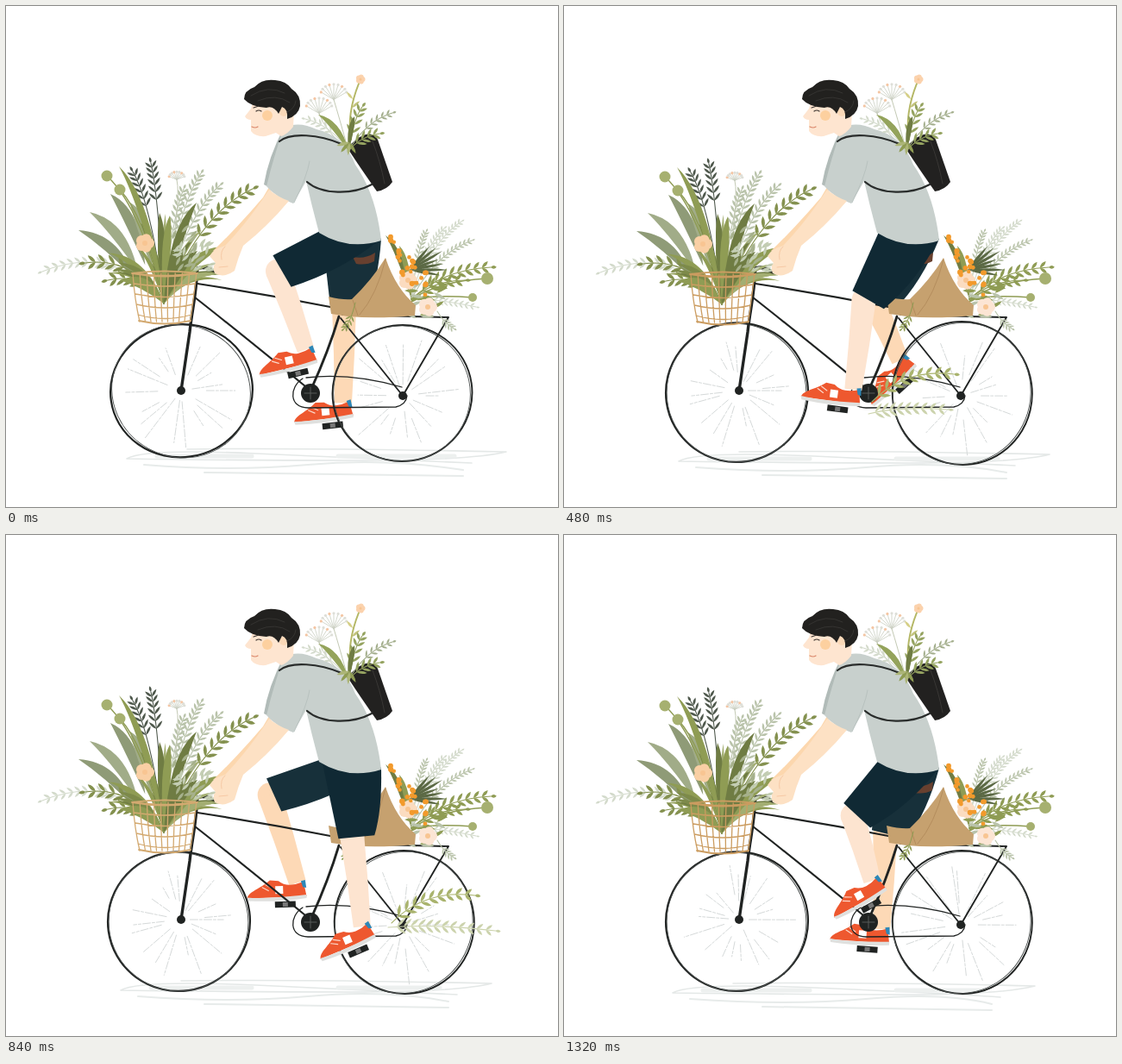
Animation, 640 px wide and 581 px high, one loop 1.44 s. Source, as an HTML page:

```html
<!DOCTYPE html>
<html lang="en">
<head>
<meta charset="utf-8">
<title>Flower ride</title>
<style>
html, body { margin: 0; width: 100%; height: 100%; overflow: hidden; background: #fff; }
svg { display: block; width: 100%; height: 100%; }
</style>
</head>
<body>
<svg id="stage" viewBox="0 0 640 581" fill="none" stroke-linecap="round" stroke-linejoin="round">
  <g id="back"></g>
  <g id="bike"></g>
  <g id="basket"></g>
  <g id="front"></g>
  <g id="rider"></g>
</svg>
<script>
const STEP = 120, COUNT = 12, { sin, cos, PI } = Math;
const INK = '#202322', OLIVE = '#8f9c54', MOSS = '#6f7c43', SAGE = '#b9c3aa', PALE = '#d3dacb', SLATE = '#4e584c';
const layer = id => document.getElementById(id);

// Drawing helpers
const fill = (d, c) => `<path d="${d}" fill="${c}"/>`;
const line = (d, c = INK, w = 2, extra = '') => `<path d="${d}" stroke="${c}" stroke-width="${w}" ${extra}/>`;
const dot = (x, y, r, c) => `<circle cx="${x}" cy="${y}" r="${r}" fill="${c}"/>`;
const oval = (x, y, rx, ry, c, w, turn = 0) =>
  `<ellipse cx="${x}" cy="${y}" rx="${rx}" ry="${ry}" stroke="${c}" stroke-width="${w}" transform="rotate(${turn} ${x} ${y})"/>`;
const each = (list, f) => list.map(f).join('');
const times = (n, f) => each([...Array(n).keys()], f);
const mix = (a, b, t) => [a[0] + (b[0] - a[0]) * t, a[1] + (b[1] - a[1]) * t];

function random(seed) {
  return () => (seed = (seed * 16807) % 2147483647) / 2147483647;
}

function leaf([x, y], angle, len, w, c) {
  const at = `translate(${x.toFixed(1)} ${y.toFixed(1)}) rotate(${angle.toFixed(1)})`;
  return `<path d="M0 0Q${len / 2} ${-w} ${len} 0Q${len / 2} ${w} 0 0" fill="${c}" transform="${at}"/>`;
}

// Stems rise from the root and lean over; flat ones arch more
function bend([x0, y0], [x1, y1], lift) {
  const dx = x1 - x0, flat = Math.abs(dx) / Math.hypot(dx, y1 - y0);
  return [x0 + dx * .4, y0 + (y1 - y0) * .75 - lift * Math.abs(dx) * flat ** 4];
}

function sprig(root, tip, len, w, c, from = .4, lift = .35) {
  const mid = bend(root, tip, lift), size = Math.hypot(tip[0] - root[0], tip[1] - root[1]);
  const n = Math.max(4, Math.round(size * (1 - from) / len / .75));
  return line(`M${root}Q${mid} ${tip}`, c, 1.1) + times(n + 1, i => {
    const t = from + (1 - from) * i / n, a = mix(root, mid, t), b = mix(mid, tip, t), p = mix(a, b, t);
    const turn = Math.atan2(b[1] - a[1], b[0] - a[0]) * 180 / PI, l = len * (1.15 - .4 * t);
    return i === n ? leaf(p, turn, l * .7, w, c) : leaf(p, turn - 42, l, w, c) + leaf(p, turn + 42, l, w, c);
  });
}

function blade(root, tip, w, c, lift = .35) {
  const [cx, cy] = bend(root, tip, lift), d = Math.hypot(tip[0] - root[0], tip[1] - root[1]);
  const ox = (root[1] - tip[1]) / d * w, oy = (tip[0] - root[0]) / d * w;
  return fill(`M${root}Q${cx + ox} ${cy + oy} ${tip}Q${cx - ox} ${cy - oy} ${root}`, c);
}

function bud(root, tip, r) {
  return line(`M${root}Q${bend(root, tip, .05)} ${tip}`, OLIVE, 1.5) + dot(...tip, r, '#a6b070');
}

function umbel(root, [x, y], r) {
  const hub = [x, y + r * .7];
  return line(`M${root}Q${x + 6} ${y + 30} ${hub}`, '#c3c9b4', 1) + times(9, i => {
    const a = PI * (1.06 + i * .11), p = [x + r * cos(a), y + 4 + r * .75 * sin(a)];
    return line(`M${hub}L${p}`, '#c9cec0', .8) + dot(...p, 1.6, i % 3 ? '#dedfd8' : '#f4c6a4');
  });
}

function bloom(x, y, r, c) {
  return times(5, i => dot(x + r * .5 * cos(i * 1.257), y + r * .5 * sin(i * 1.257), r * .6, c)) + dot(x, y, r * .3, '#f8c592');
}

// Pedalling: smooth cycles for shoe, knee and shoe angle
function pose(phase) {
  const a = phase * PI / 6, c = cos(a), s = sin(a), c2 = cos(2 * a), s2 = sin(2 * a);
  return {
    shoe: [349 - 24 * c - 56 * s + 3 * cos(3 * a) + 9 * sin(3 * a) - 2 * c2 + 7 * s2, 441.5 - 29.5 * c - 7.5 * s],
    knee: [353.5 - 38.5 * c - 29 * s, 334 - 20.5 * c - 13.5 * s - 6 * c2 - 6 * s2],
    turn: -15 - 3.5 * c + 27 * s + 5 * c2
  };
}

function shoe([x, y], turn) {
  return `<g transform="translate(${x} ${y}) rotate(${turn})">` +
    fill('M-3 13H21V20H-3Z', INK) + fill('M6 14H12V19H6Z', '#777') +
    fill('M-35 8C-33 0-20-2-8-12L2-11Q8-6 15-6Q23-6 31-9L34 8Z', '#ee582f') +
    fill('M-35 7Q-15 10 34 6L34 10Q0 14-34 11Z', '#dfe0de') +
    fill('M28-10L33-11L34-2L30-3Z', '#2d87b7') +
    line('M-13-7L-6-3M-17-4L-10 0', '#fbd9cc', 1.2) + fill('M-2-5H7V4H-2Z', '#fff') + '</g>';
}

function leg(phase, skin, cloth) {
  const { shoe: foot, knee, turn } = pose(phase), r = turn * PI / 180;
  const ankle = [foot[0] + 24 * cos(r) + 8 * sin(r), foot[1] + 24 * sin(r) - 8 * cos(r)];
  const side = (a, b, p, k) => {
    const d = Math.hypot(b[0] - a[0], b[1] - a[1]);
    return [p[0] + (b[1] - a[1]) / d * k, p[1] - (b[0] - a[0]) / d * k];
  };
  const calf = (p, k) => side(knee, ankle, p, k), mid = mix(knee, ankle, .5);
  const hip = [398, 262], hem = [knee[0] + 5, knee[1]];
  const h1 = side(hip, hem, hem, -21), h2 = side(hip, hem, hem, 21);
  return dot(...knee, 14, skin) +
    fill(`M${calf(knee, -14)}L${calf(knee, 14)}Q${calf(mid, 13)} ${calf(ankle, 10)}L${calf(ankle, -10)}Q${calf(mid, -11)} ${calf(knee, -14)}`, skin) +
    shoe(foot, turn) +
    fill(`M366 260L${h1}L${h2}Q${(h2[0] + 435) / 2 + 5} ${(h2[1] + 272) / 2 + 9} 435 270Z`, cloth);
}

// Wheels wobble and the ground shifts in threes
function spokes(x, y, seed) {
  const rnd = random(seed);
  return line(times(19, i => {
    const a = (i + rnd() * .8) * 2 * PI / 19, p = 10 + rnd() * 20, q = 40 + rnd() * 30;
    return `M${x + cos(a) * p} ${y + sin(a) * p}L${x + cos(a) * q} ${y + sin(a) * q}`;
  }), '#d5d9d9', 1, 'stroke-dasharray="9 2 3 2"');
}

function wheel(x, y, rx, ry, w) {
  return oval(x, y, rx, ry, INK, w, -8) + oval(x - .5, y + .5, rx - 1.5, ry - .5, '#4a4f4e', .9, 22);
}

function wheels(k) {
  const v = k % 3, s = cos(2 * PI * k / 3);
  return spokes(203, 446, 91 + v * 677) + spokes(460, 452, 417 + v * 911) +
    wheel(201.5 + 2 * s, 447.5 - 1.3 * s, 82.5, 79.5 - 2.5 * s, 2.2) +
    wheel(461 - 1.5 * s, 449, 81, 81.7 - 2.7 * s, 1.9);
}

function ground(k) {
  const v = k % 3, a = 140 - 7 * v, b = 580 - 17 * v, y = 517 + 3 * v;
  return line(`M${a + 70} ${y - 3}Q340 ${y - 5} ${b} ${y}Q${b - 40} ${y + 10} 400 ${y + 10}T${a} ${y + 8}Q${a + 20} ${y - 4} 290 ${y + 2}T${b - 40} ${y + 13}`, '#e4e8e7', 1.6) +
    line(`M${a + 20} ${y + 15}Q260 ${y + 23} 350 ${y + 15}T${b - 50} ${y + 21}M230 ${y + 24}L${b - 50} ${y + 28}`, '#e7ebea', 2) +
    line(`M${a + 35} ${y + 5}H285M385 ${y + 5}H${b - 60}`, '#edf0ef', 5);
}

// Two sprays slip out behind the chain, slow down and fade
function sprays(k) {
  if (k < 3 || k > 10) return '';
  const s = k - 5, slow = .72 ** s, x = 383 + 30 * s;
  return `<g opacity="${Math.min(1, (11 - k) * .45)}">` +
    sprig([x, 467 - 6 * s], [640 - 140 * slow, 465 - 3 * s], 12, 3.2, k > 7 ? '#d9decb' : '#ccd3ad', .1, .06) +
    sprig([x + 4, 456 - 3 * s], [598 - 105 * slow, 424 - 3 * s], 13, 3.8, k > 8 ? '#c8cea8' : '#a9b36d', .1, .2) + '</g>';
}

function bikeArt() {
  const rnd = random(37), root = [470, 340], tan = '#c6a16f';
  return line('M222 322Q300 334 376 349M219 338Q255 366 347 441', INK, 2.2) +
    line('M386 360Q374 400 354 444', INK, 2.8) +
    line('M388 362L460 452M390 358L513 361L460 452', INK, 1.9) +
    line('M348 431Q400 425 459 442M344 432C328 442 328 466 350 466L452 465Q464 462 465 452', INK, 1.3) +
    line('M222 304C220 340 216 350 213 378L203 446', INK, 3.4) +
    line('M223 304Q233 301 242 310', INK, 4) +
    dot(203, 446, 5, INK) + dot(460, 452, 5, INK) + dot(353, 449, 11, INK) + line('M346 449H360M353 442V456', '#565a59', 1) +
    each([[528, 250], [540, 272], [508, 258], [487, 262], [545, 349]], (p, i) => sprig(root, p, 8, 2, i % 2 ? SAGE : PALE, .4, .1)) +
    each([[562, 303], [532, 318]], p => sprig(root, p, 13, 3.6, OLIVE, .25, .1)) +
    times(7, i => leaf([468, 306], -50 + i * 10, 36 + i % 3 * 4, 3.4, '#5b6944')) +
    bud(root, [558, 316], 7) + bud(root, [541, 338], 5) +
    blade(root, [440, 266], 6, MOSS) + blade(root, [456, 278], 6, OLIVE) +
    times(16, () => leaf([462 + rnd() * 45, 322 + rnd() * 38], rnd() * 80 - 50, 16, 4, rnd() < .5 ? OLIVE : SAGE)) +
    bloom(466, 318, 10, '#fbdcc0') + bloom(489, 349, 10, '#fce5d4') +
    times(26, i => dot(440 + i * 1.7 + rnd() * 12, 264 + i * 1.9 + rnd() * 28, 2 + rnd() * 1.3, '#f29a2c')) +
    fill('M374 337Q390 341 401 340Q424 318 440 292Q452 328 475 347L474 359Q430 363 398 360L377 357Z', tan) +
    line('M440 294Q430 335 410 358M402 341L408 359', '#b48d5d', 1) +
    sprig([405, 344], [392, 374], 8, 2, OLIVE) + sprig([500, 354], [519, 374], 8, 2, SAGE) +
    fill('M402 291Q416 294 428 286L427 296Q418 301 406 299Z', '#68402f');
}

function basketArt(alt) {
  const root = [183, 345], rnd = random(53), greens = [OLIVE, MOSS, '#a3ae72', '#7d8a4a'];
  const wood = alt ? '#cb9c60' : '#d3a970';
  const weave = times(10, i => `M${147 + i * 8.2} 310Q${149 + i * 7.6} 340 ${155 + i * 6.5} 366`) +
    times(5, i => `M${147 + i * 1.5} ${310 + i * 12}Q184 ${315 + i * 13} ${221 - i * 1.5} ${310 + i * 12}`);
  return `<g transform="translate(0 ${alt ? 1 : 0})">` +
    each([[42, 308], [226, 194], [248, 208], [206, 212]], (p, i) => sprig(root, p, 11, 2.7, i ? SAGE : PALE, .45)) +
    each([[84, 260], [97, 239], [121, 218], [144, 228]], (p, i) => blade(mix(root, p, .35), p, 12, i % 2 ? '#a1ac88' : '#8f9b77', .1)) +
    each([[117, 197], [132, 213]], p => bud(root, p, 6.5)) +
    each([[168, 182], [147, 192]], p => sprig(root, p, 13, 2.8, SLATE, .62)) +
    umbel(root, [198, 195], 9) +
    each([[92, 298], [118, 318], [286, 212]], p => sprig(root, p, 15, 4, '#84914f', .45)) +
    times(26, i => {
      const a = -PI * (.12 + .76 * rnd()), r = 55 + 50 * rnd() * Math.abs(sin(a));
      return blade(root, [183 + r * cos(a), 345 + r * sin(a)], 4 + rnd() * 4, greens[i % 4]);
    }) +
    each([[131, 186], [178, 240], [190, 243], [221, 228], [253, 279], [222, 284], [132, 318]], (p, i) => blade(root, p, 8 + i * .8, greens[i % 2])) +
    times(34, () => leaf([192 + rnd() * 42, 262 + rnd() * 48], -90 + rnd() * 90, 12, 3.4, rnd() < .6 ? '#c3cdb3' : '#a6b18c')) +
    bloom(161, 275, 10, '#f9cfa4') +
    line(weave, wood, 1.3) + line('M146 310Q184 305 222 310Q184 317 146 310M154 365Q184 372 214 365', wood, 1.8) + '</g>';
}

function riderArt() {
  const skin = '#fde1c4', shade = '#fcd7ae', root = [397, 168];
  return umbel(root, [380, 98], 15) + umbel(root, [363, 114], 15) +
    line('M400 155Q395 125 409 90', '#b4b765', 2) + bloom(411, 85, 5, '#fbd2ad') +
    leaf([402, 108], -130, 11, 3, '#d5cf87') + leaf([401, 118], -40, 12, 3, '#c3c47d') +
    fill('M305 210L298 222Q270 255 240 284L252 290L312 225Z', shade) +
    fill('M322 141Q304 176 299 207L312 214L330 160Z', '#b1bbb8') +
    fill('M322 141Q340 133 360 143Q392 150 405 184Q429 218 435 272Q397 284 363 263Q355 234 348 203L333 229Q313 222 302 209Q310 176 322 141Z', '#c8d0cd') +
    line('M352 180Q349 198 334 228', '#b8c2bf', 1) +
    fill('M396 165Q405 153 417 149Q427 147 431 155L448 204Q442 213 430 215Q411 188 396 165Z', '#222120') +
    line('M425 157Q434 180 439 206', '#393735', 1) +
    line('M317 157C330 146 363 149 389 160M349 204C366 219 402 219 424 207', '#292c2b', 2.2) +
    each([[448, 124], [347, 131]], (p, i) => sprig(root, p, 9, 2.3, i ? PALE : '#a3ae8c', .45, .1)) +
    each([[413, 117], [433, 148]], p => sprig(root, p, 12, 3.2, '#95a360', .3, .1)) +
    blade(root, [362, 126], 7, '#94a35b', .1) + blade(root, [404, 128], 6, MOSS) +
    times(4, i => leaf([398, 158], 60 + i * 35, 15, 4, i % 2 ? '#acb577' : OLIVE)) +
    fill('M305 213Q316 222 328 226Q306 253 275 278Q269 292 265 307Q253 316 242 310Q239 302 243 298L236 290Q241 281 254 278Q280 251 305 213Z', skin) +
    line('M254 279Q248 284 250 294M247 303L257 302', '#f6c9a5', 1) +
    fill('M286 112L284 119L277 128Q279 132 284 132L284 145Q289 152 301 151L313 147L319 151Q326 149 333 140L334 121L310 108Z', '#fee5d0') +
    dot(303, 127, 6, '#fdd09f') + dot(322, 123, 5, '#fbd9b8') +
    fill('M276 108Q276 98 288 94Q297 84 312 86Q325 87 331 96Q342 103 341 116Q339 127 326 131Q327 119 320 117L316 125Q310 115 302 118Q284 117 276 108Z', '#22211f') +
    line('M284 104Q304 91 323 101M292 110Q313 101 329 112M326 123Q335 119 336 110', '#3a3937', .8) +
    line('M290 122Q293 120 296 122M287 118L293 116', '#3b3430', 1.2) + line('M285 140Q289 142 292 140', '#d98467', 1.2);
}

layer('bike').innerHTML = bikeArt();
layer('rider').innerHTML = riderArt();

let shown = -1;
function draw(ms) {
  const k = Math.floor(ms / STEP) % COUNT;
  if (k === shown) return;
  shown = k;
  layer('back').innerHTML = ground(k) + leg(k + 6, '#fdd9b6', '#17303a') + wheels(k);
  layer('basket').innerHTML = basketArt(k % 6 > 2);
  layer('front').innerHTML = sprays(k) + leg(k, '#fde4d0', '#102934');
}

const start = performance.now();
function tick() {
  draw(performance.now() - start);
  requestAnimationFrame(tick);
}
tick();
</script>
</body>
</html>
```
